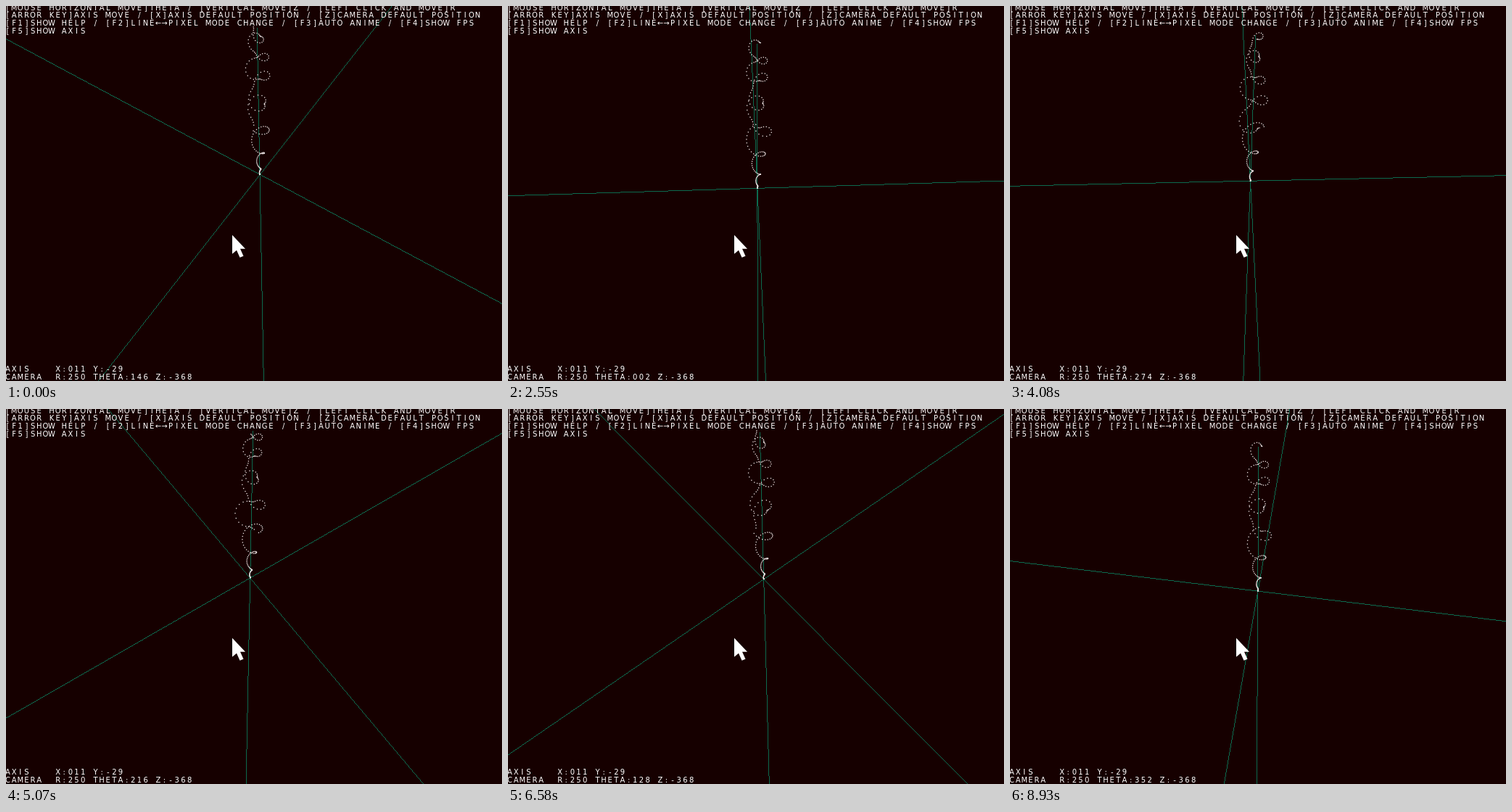
An HTML page with a canvas for the animation above (9 s loop, 684 by 517 pixels).

```html
<!DOCTYPE html>
<html lang="en">
<head>
<meta charset="utf-8">
<title>Helix viewer</title>
<style>
  html, body { margin: 0; width: 100%; height: 100%; overflow: hidden; background: #160000; }
  canvas { display: block; }
</style>
</head>
<body>
<canvas id="stage" width="684" height="517"></canvas>
<script>
const W = 684, H = 517, LOOP = 9000, STEP = 69.29;
const CX = 343.5, CY = 259.7, FOCAL = 485;
const RADIUS = 250, CAMERA_Z = -368, TARGET = [11, 0, -29];
const AXIS_LENGTH = 800, DOTS = 180, CELL = 8.64;
const ctx = document.getElementById('stage').getContext('2d');
const rad = deg => deg * Math.PI / 180;

const help = [
  '[MOUSE HORIZONTAL MOVE]THETA / [VERTICAL MOVE]Z / [LEFT CLICK AND MOVE]R',
  '[ARROR KEY]AXIS MOVE / [X]AXIS DEFAULT POSITION / [Z]CAMERA DEFAULT POSITION',
  '[F1]SHOW HELP / [F2]LINE←→PIXEL MODE CHANGE / [F3]AUTO ANIME / [F4]SHOW FPS',
  '[F5]SHOW AXIS'
];

// A helix on a cone that becomes a rippled column higher up.
const helix = Array.from({ length: DOTS }, (_, i) => {
  const ripple = i > 78 ? 1 + 0.45 * Math.sin(0.45 * i) : 1;
  const r = Math.min(i * i / 310, 19) * ripple;
  const a = rad(15 * i - 95);
  return [r * Math.cos(a), r * Math.sin(a), i * i / 40];
});

function thetaAt(time) {
  const n = Math.max(0, Math.floor((time - 48.7) / STEP));
  const drift = n > 10 && n < 28 ? 2 : n > 64 ? -2 : 0;
  return (146 - 4 * n + drift + 720) % 360;
}

// Returns a function turning world points into [right, up, depth].
function makeCamera(theta) {
  const eye = [RADIUS * Math.cos(rad(theta)), RADIUS * Math.sin(rad(theta)), CAMERA_Z];
  const [dx, dy, dz] = TARGET.map((v, k) => v - eye[k]);
  const flat = Math.hypot(dx, dy), dist = Math.hypot(flat, dz);
  const fx = dx / flat, fy = dy / flat, cos = flat / dist, sin = dz / dist;
  return p => {
    const [x, y, z] = p.map((v, k) => v - eye[k]);
    const ahead = x * fx + y * fy;
    return [x * fy - y * fx, z * cos - ahead * sin, ahead * cos + z * sin];
  };
}

const project = ([x, y, depth]) => [CX + FOCAL * x / depth, CY - FOCAL * y / depth];

function pixelLine([x0, y0], [x1, y1]) {
  const steep = Math.abs(y1 - y0) > Math.abs(x1 - x0);
  if (steep) [x0, y0, x1, y1] = [y0, x0, y1, x1];
  if (x0 > x1) [x0, y0, x1, y1] = [x1, y1, x0, y0];
  const slope = (y1 - y0) / (x1 - x0);
  const end = Math.min(x1, steep ? H : W);
  for (let a = Math.max(0, Math.floor(x0)); a < end; a++) {
    const b = Math.floor(y0 + (a - x0) * slope);
    if (steep) ctx.fillRect(b, a, 1, 1);
    else ctx.fillRect(a, b, 1, 1);
  }
}

function drawAxis(camera, k) {
  const end = s => camera([0, 1, 2].map(j => j === k ? s * AXIS_LENGTH : 0));
  const near = 20;
  let a = end(-1), b = end(1);
  if (a[2] > b[2]) [a, b] = [b, a];
  if (a[2] < near) {
    const f = (near - a[2]) / (b[2] - a[2]);
    a = a.map((v, j) => v + (b[j] - v) * f);
  }
  pixelLine(project(a), project(b));
}

// Every character is centred in its cell of a fixed grid.
function gridText(line, baseline) {
  [...line].forEach((c, i) => ctx.fillText(c, 2.5 + i * CELL, baseline));
}

function drawText(theta) {
  ctx.fillStyle = '#fff';
  ctx.font = '10px "DejaVu Sans", sans-serif';
  ctx.textAlign = 'center';
  help.forEach((line, i) => gridText(line, 5.5 + i * 10.7));
  gridText('AXIS    X:011 Y:-29', 504);
  gridText(`CAMERA  R:250 THETA:${String(theta).padStart(3, '0')} Z:-368`, 515);
}

const cursor = new Path2D('M312 315.8V341.8L318 336.8L322.5 346.8L327.5 344.8L323 334.8H330Z');

function draw(time) {
  const theta = thetaAt(time), camera = makeCamera(theta);
  ctx.fillStyle = '#160000';
  ctx.fillRect(0, 0, W, H);
  ctx.fillStyle = '#0c6a4e';
  for (let k = 0; k < 3; k++) drawAxis(camera, k);
  ctx.fillStyle = '#eee6e6';
  for (const p of helix) {
    const [x, y] = project(camera(p));
    ctx.fillRect(x - 0.65, y - 0.65, 1.3, 1.3);
  }
  drawText(theta);
  ctx.fillStyle = '#fff';
  ctx.fill(cursor);
}

const start = performance.now();
function tick() {
  draw((performance.now() - start) % LOOP);
  requestAnimationFrame(tick);
}
tick();
</script>
</body>
</html>
```
